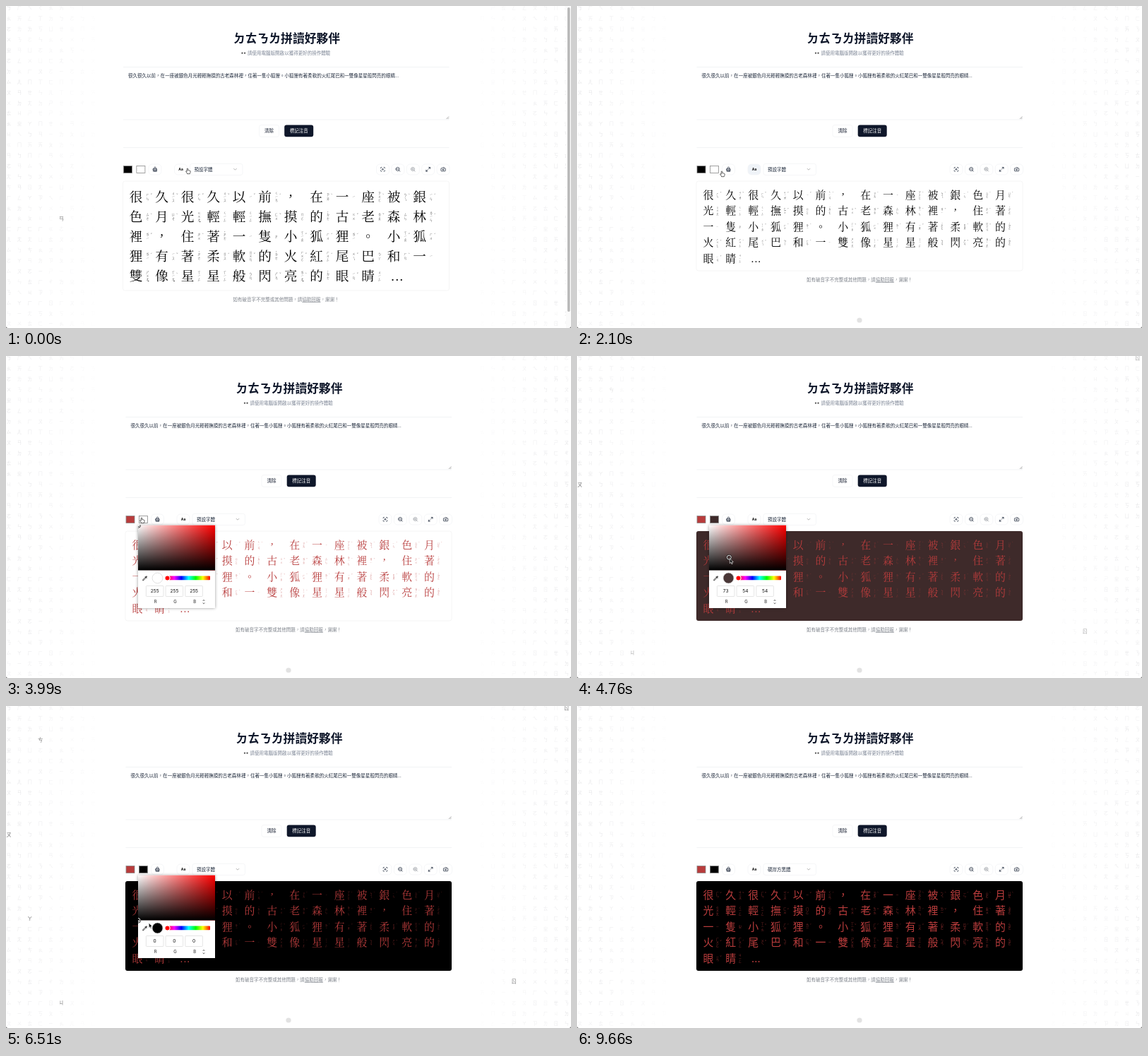
These frames come from a looping animation (800 px wide and 456 px high, 9730 ms). An HTML page:

```html
<!DOCTYPE html>
<html lang="zh-Hant">
<head>
<meta charset="utf-8">
<title>注音標記</title>
<style>
  html, body { margin: 0; width: 100%; height: 100%; overflow: hidden; background: #fff; }
  #stage { display: block; width: 100vw; height: 100vh; }
  text { font-family: "Noto Sans CJK TC", "Noto Sans CJK", sans-serif; white-space: pre; }
  .latin { font-family: Inter, "Liberation Sans", sans-serif; }
  .serif text { font-family: "Noto Serif CJK TC", "Noto Serif CJK", "Noto Sans CJK TC", serif; }
  .mid { text-anchor: middle; }
  .icon { fill: none; stroke-linecap: round; stroke-linejoin: round; stroke-width: 2.4; }
</style>
</head>
<body>
<svg id="stage" viewBox="0 0 800 456">
  <defs>
    <linearGradient id="sat"><stop stop-color="#fff"/><stop offset="1" stop-color="#f00"/></linearGradient>
    <linearGradient id="val" x2="0" y2="1"><stop stop-opacity="0"/><stop offset="1"/></linearGradient>
    <linearGradient id="hue"></linearGradient>
    <filter id="soft" x="-10%" y="-10%" width="120%" height="120%"><feGaussianBlur stdDeviation="2"/></filter>
  </defs>
  <g id="letters"></g>
  <g id="page"></g>
  <g id="scrollbar">
    <rect x="793" width="7" height="456" fill="#fafafa"/>
    <rect x="795" y="2" width="3.6" height="431" rx="1.8" fill="#b9b9b9"/>
  </g>
  <g id="menu"></g>
  <g id="picker"></g>
  <path fill="#666" d="M0 453v3h3a3 3 0 0 1-3-3zM800 453v3h-3a3 3 0 0 0 3-3z"/>
  <g id="cursor" stroke="#111" stroke-width=".8" stroke-linejoin="round" fill="#fff">
    <path id="hand" transform="scale(.8)" d="M-1 1a1 1 0 0 1 2 0v2.6q1-.6 1.5.2 1-.5 1.4.3 1.2-.2 1.2.8v1.6q0 1.2-1 2.2v.9H-.6v-.9L-2.8 5.6q-.3-1.1.8-1L-1 5.4z"/>
    <path id="arrow" fill="#111" stroke="#fff" stroke-width=".6" d="M0 0v7l1.6-1.5 1.1 2.5 1.2-.5-1.1-2.4h2.2z"/>
  </g>
</svg>
<script>
const LOOP = 9730;
const STORY = '很久很久以前，在一座被銀色月光輕輕撫摸的古老森林裡，住著一隻小狐狸。小狐狸有著柔軟的火紅尾巴和一雙像星星般閃亮的眼睛';
const SOUNDS = {};
('很ㄏㄣˇ 久ㄐㄧㄡˇ 以ㄧˇ 前ㄑㄧㄢˊ 在ㄗㄞˋ 一ㄧ 座ㄗㄨㄛˋ 被ㄅㄟˋ 銀ㄧㄣˊ 色ㄙㄜˋ 月ㄩㄝˋ 光ㄍㄨㄤ 輕ㄑㄧㄥ 撫ㄈㄨˇ 摸ㄇㄛ ' +
 '的ㄉㄜ˙ 古ㄍㄨˇ 老ㄌㄠˇ 森ㄙㄣ 林ㄌㄧㄣˊ 裡ㄌㄧˇ 住ㄓㄨˋ 著ㄓㄜ˙ 隻ㄓ 小ㄒㄧㄠˇ 狐ㄏㄨˊ 狸ㄌㄧˊ 有ㄧㄡˇ 柔ㄖㄡˊ 軟ㄖㄨㄢˇ 火ㄏㄨㄛˇ ' +
 '紅ㄏㄨㄥˊ 尾ㄨㄟˇ 巴ㄅㄚ 和ㄏㄢˋ 雙ㄕㄨㄤ 像ㄒㄧㄤˋ 星ㄒㄧㄥ 般ㄅㄢ 閃ㄕㄢˇ 亮ㄌㄧㄤˋ 眼ㄧㄢˇ 睛ㄐㄧㄥ')
  .split(' ').forEach(s => SOUNDS[s[0]] = s.slice(1));

const $ = id => document.getElementById(id);
function add(parent, tag, attrs = {}, content) {
  const el = document.createElementNS('http://www.w3.org/2000/svg', tag);
  for (const k in attrs) el.setAttribute(k, attrs[k]);
  if (content !== undefined) el.textContent = content;
  return parent.appendChild(el);
}
const show = (el, on) => el.setAttribute('visibility', on ? 'visible' : 'hidden');
// y is the optical middle of the glyphs
const label = (parent, x, y, size, fill, str, more) =>
  add(parent, 'text', { x, y: y + size * .375, 'font-size': size, fill, ...more }, str);
const box = (parent, x, y, width, height, fill, more) =>
  add(parent, 'rect', { x, y, width, height, fill, ...more });
const icon = (parent, x, y, d, stroke = '#1e293b') =>
  add(parent, 'path', { class: 'icon', d, stroke, transform: `translate(${x - 3.8} ${y - 3.8}) scale(.315)` });
const mid = { class: 'mid' }, edge = { rx: 3, stroke: '#f1f2f5', 'stroke-width': .7 };

// Faint backdrop of phonetic letters, fading out towards the middle.
const PITCH = 14.9, cellX = c => 4 + c * PITCH, cellY = r => 3 + r * PITCH;
let seed = 7;
const random = () => (seed = seed * 16807 % 2147483647) / 2147483647;
for (let r = 0; r < 31; r++) for (let c = 0; c < 54; c++) {
  const letter = String.fromCharCode(0x3105 + Math.floor(random() * 37));
  const alpha = Math.min(1, (Math.abs(cellX(c) - 400) - 260) / 130) * (.07 + .08 * random());
  if (alpha > .01) label($('letters'), cellX(c), cellY(r), 6.5, '#334', letter, { ...mid, opacity: alpha.toFixed(3) });
}
const glows = [
  [5, 20, 'ㄢ', -500, 700], [3, 3, 'ㄘ', 4700, 8700], [0, 12, 'ㄡ', 4300, 8800], [2, 20, 'ㄚ', 4900, 8600],
  [5, 28, 'ㄐ', 4500, 8900], [48, 26, 'ㄖ', 4500, 8800], [53, 0, 'ㄖ', 4500, 8900]
].map(([c, r, letter, from, to]) => ({
  from, to, el: label($('letters'), cellX(c), cellY(r), 7.5, '#555', letter, mid)
}));

// Page
const page = $('page'), INK = '#0f172a', LINE = '#eceef1', BODY = 6.53;
const rule = y => add(page, 'path', { d: `M169.5 ${y}h461.5`, stroke: LINE, 'stroke-width': .7 });
label(page, 401, 45.3, 16.8, INK, 'ㄉㄊㄋㄌ拼讀好夥伴', { ...mid, 'font-weight': 700 });
for (const x of [338.2, 341.8]) {
  add(page, 'ellipse', { cx: x, cy: 66.5, rx: 1.5, ry: 1.7, fill: '#ddd' });
  add(page, 'circle', { cx: x - .3, cy: 66.7, r: .9, fill: '#333' });
}
label(page, 345.5, 67, BODY, '#7b8494', '請使用電腦版開啟以獲得更好的操作體驗');
rule(86.5);
rule(161);
label(page, 176.5, 99, BODY, '#1e293b', STORY + '...');
add(page, 'path', { d: 'M627 160l3.5-3.5M629 160l1.5-1.5', stroke: '#777', 'stroke-width': .6 });
box(page, 362, 168.5, 28, 16.8, '#fff', edge);
label(page, 376, 177, BODY, INK, '清除', { ...mid, 'font-weight': 500 });
box(page, 397.7, 168.5, 41, 16.8, INK, { rx: 3 });
label(page, 418.2, 177, BODY, '#fff', '標記注音', { ...mid, 'font-weight': 500 });
rule(200.5);

const swatches = [170, 188.4].map(x => box(page, x, 226.5, 12, 10, '#000', { stroke: '#8a8a8a', 'stroke-width': .8 }));
const button = x => box(page, x - 9, 224, 18, 15, '#fff', { ...edge, rx: 5 });
button(214.5);
icon(page, 214.5, 231.3, 'M8 10V5a4 3 0 0 1 8 0v5M4 10h16v5H4zM5 15l-1 6h16l-1-6M10 21v-3M15 21v-3');
const sizeButton = button(251);
label(page, 251, 231.3, 5, '#111', 'Aa', { class: 'mid latin', 'font-weight': 700 });
box(page, 264, 223.3, 74.5, 16.2, '#fff', edge);
const fontName = label(page, 270, 231.3, BODY, '#1e293b');
icon(page, 328, 231.3, 'M6 9l6 6 6-6', '#999');

const LENS = 'M3 11a8 8 0 1 0 16 0a8 8 0 1 0-16 0M21 21l-4.3-4.3M8 11h6';
[
  'M3 7V5a2 2 0 0 1 2-2h2M17 3h2a2 2 0 0 1 2 2v2M21 17v2a2 2 0 0 1-2 2h-2M7 21H5a2 2 0 0 1-2-2v-2M9 12a3 3 0 1 0 6 0a3 3 0 1 0-6 0',
  LENS,
  LENS + 'M11 8v6',
  'M15 3h6v6M9 21H3v-6M21 3l-7 7M3 21l7-7',
  'M14.5 4h-5L7 7H4a2 2 0 0 0-2 2v9a2 2 0 0 0 2 2h16a2 2 0 0 0 2-2V9a2 2 0 0 0-2-2h-3zM9 13a3 3 0 1 0 6 0a3 3 0 1 0-6 0'
].forEach((d, i) => {
  const x = 537 + i * 21.4;
  button(x);
  icon(page, x, 231.3, d, i === 2 ? '#94989f' : undefined);
});

const panel = box(page, 169, 248, 462, 127, '#fff', { rx: 3, stroke: '#000', 'stroke-opacity': .06, 'stroke-width': .7 });

function annotated(size, columns, x0, y0, dx) {
  const g = add(page, 'g', { class: 'serif' });
  const place = i => [x0 + i % columns * dx, y0 + Math.floor(i / columns) * size * 1.5];
  [...STORY].forEach((ch, i) => {
    const [x, y] = place(i), small = size * .285;
    label(g, x, y, size, 'currentColor', ch, mid);
    const sound = SOUNDS[ch] || '', parts = sound.replace(/[ˇˊˋ˙]/, ''), tone = sound.slice(parts.length);
    const top = y - (parts.length - 1) * small / 2;
    const tiny = (px, py, str) => label(g, px, py, small, 'currentColor', str, { ...mid, opacity: .8 });
    [...parts].forEach((p, k) => tiny(x + size * .87, top + k * small, p));
    if (tone === '˙') tiny(x + size * .87, top - small * .7, tone);
    else if (tone) tiny(x + size * 1.17, y - small * .4, tone);
  });
  const [x, y] = place(STORY.length);
  label(g, x + size * .25, y, size, 'currentColor', '...', mid);
  return g;
}
const large = annotated(18.66, 12, 187.6, 270, 36.5);
const small = annotated(14.93, 14, 186, 267.5, 31.8);

const foot = add(page, 'g');
const note = label(foot, 400, 387.5, BODY, '#7d828a', '如有破音字不完整或其他問題，請', mid);
add(note, 'tspan', { 'text-decoration': 'underline' }, '協助回報');
add(note, 'tspan', {}, '，謝謝！');
add(foot, 'circle', { cx: 400, cy: 445, r: 3.6, fill: '#e2e2e2' });

// Font menu
const FONTS = ['預設字體', '硯岸方黑體'];
box($('menu'), 264, 242, 74.5, 30, '#fff', { ...edge, stroke: '#dfe2e7' });
const hover = box($('menu'), 266, 256.5, 70.5, 13, '#f1f5f9', { rx: 2 });
FONTS.forEach((f, i) => label($('menu'), 270, 250.5 + i * 12.5, BODY, '#1e293b', f));

// Colour picker
const PAD_W = 109, PAD_H = 64, PAD_Y = 240;
for (let i = 0; i <= 6; i++) add($('hue'), 'stop', { offset: i / 6, 'stop-color': `hsl(${360 - i * 60} 100% 50%)` });
box($('picker'), 0, PAD_Y, PAD_W, 117, '#000', { opacity: .4, filter: 'url(#soft)' });
const pop = add($('picker'), 'svg', { y: PAD_Y - .5, width: PAD_W, height: 117.5 });
box(pop, 0, 0, PAD_W, 118, '#fff');
for (const fill of ['url(#sat)', 'url(#val)']) box(pop, 0, 0, PAD_W, PAD_H, fill);
const thumb = add(pop, 'g');
add(thumb, 'circle', { r: 3, fill: 'none', stroke: '#111', 'stroke-width': 1.8 });
add(thumb, 'circle', { r: 3, fill: 'none', stroke: '#fff', 'stroke-width': .9 });
icon(pop, 10, 75, 'M2 22l1-4L13 8l3 3L6 21zM12 5l7 7M15 8l3-5 3 3-5 3z', '#111');
const chip = add(pop, 'circle', { cx: 27.5, cy: 75, r: 7.4, stroke: '#ccc', 'stroke-width': .6 });
box(pop, 41, 72, 61, 5.8, 'url(#hue)', { rx: 1 });
add(pop, 'circle', { cx: 41.5, cy: 75, r: 3.6, fill: '#f00', stroke: '#fff', 'stroke-width': 1.2 });
const fields = ['R', 'G', 'B'].map((name, i) => {
  const x = 23.7 + i * 27.7;
  box(pop, x - 12.3, 86, 24.6, 15, '#fff', { rx: 1, stroke: '#d4d4d4', 'stroke-width': .6 });
  label(pop, x + 1, 108.7, 6, '#222', name, { class: 'mid latin' });
  return label(pop, x, 93.5, 6.6, '#111', '', { class: 'mid latin' });
});
add(pop, 'path', { d: 'M91.7 107.5l1.3-1.8 1.3 1.8M91.7 109.8l1.3 1.8 1.3-1.8', fill: 'none', stroke: '#444', 'stroke-width': .7 });

// Motion: [time, x, y] or [time, saturation, value]
const INK_TRACK = [[2600, 0, 0], [2900, .75, .55], [3200, .673, .722]];
const PAPER_TRACK = [[4250, 0, 1], [4690, .32, .243], [4760, .26, .286], [5250, 0, .259], [5700, 0, .259], [6200, 0, 0]];
const CURSOR_TRACK = [
  [0, 257, 230], [1900, 257, 230], [2100, 205, 234], [2280, 177, 230], [2400, 177, 230], [2600, 169, 304],
  [3200, 242.4, 257.8], [3500, 242.4, 257.8], [3800, 192, 229], [4050, 192, 229], [4250, 187, 240],
  [6200, 187, 304], [6400, 187, 304], [6900, 310, 330], [7200, 310, 330], [7560, 288, 279], [7800, 288, 279],
  [8250, 300, 230], [8600, 300, 230], [8950, 288, 261]
];
const linear = u => u, ease = u => u * u * (3 - 2 * u);
function sample(track, t, curve = linear) {
  const next = track.findIndex(p => p[0] > t);
  if (next < 0) return track[track.length - 1].slice(1);
  if (next === 0) return track[0].slice(1);
  const a = track[next - 1], b = track[next], u = curve((t - a[0]) / (b[0] - a[0]));
  return [a[1] + (b[1] - a[1]) * u, a[2] + (b[2] - a[2]) * u];
}
const channels = ([s, v]) => [v, v * (1 - s), v * (1 - s)].map(c => Math.round(c * 255));
const rgb = sv => `rgb(${channels(sv)})`;
const within = (t, from, to) => t >= from && t < to;

function render(t) {
  const big = t < 1050, sans = t >= 9300;
  page.setAttribute('transform', `translate(${big ? -3.5 : 0} 0)`);
  show($('scrollbar'), big);
  show(large, big);
  show(small, !big);
  panel.setAttribute('height', big ? 155 : 127);
  foot.setAttribute('transform', `translate(0 ${big ? 28 : 0})`);
  small.setAttribute('class', sans ? '' : 'serif');
  fontName.textContent = FONTS[+sans];
  sizeButton.setAttribute('fill', within(t, 1000, 2200) ? '#eff3f8' : '#fff');

  const ink = rgb(sample(INK_TRACK, t - 70)), paper = rgb(sample(PAPER_TRACK, t - 70));
  large.style.color = small.style.color = ink;
  panel.setAttribute('fill', paper);
  swatches[0].setAttribute('fill', ink);
  swatches[1].setAttribute('fill', paper);

  const inkOpen = within(t, 2380, 3600), paperOpen = within(t, 3950, 7100);
  const left = inkOpen ? 169 : 187;
  const tone = sample(inkOpen ? INK_TRACK : PAPER_TRACK, t);
  const [px, py] = [tone[0] * PAD_W, (1 - tone[1]) * PAD_H];
  show($('picker'), inkOpen || paperOpen);
  $('picker').setAttribute('transform', `translate(${left} 0)`);
  thumb.setAttribute('transform', `translate(${px} ${py})`);
  chip.setAttribute('fill', rgb(tone));
  channels(tone).forEach((c, i) => fields[i].textContent = c);

  show($('menu'), within(t, 8400, 9300));
  show(hover, within(t, 8850, 9300));

  const dragging = within(t, 2600, 3500) || within(t, 4250, 6400);
  const pointing = dragging || within(t, 6400, 7100);
  const [cx, cy] = dragging ? [left + px + 1, PAD_Y + py + 1] : sample(CURSOR_TRACK, t, ease);
  $('cursor').setAttribute('transform', `translate(${cx} ${cy})`);
  show($('hand'), !pointing && t < 9590);
  show($('arrow'), pointing);

  for (const { el, from, to } of glows)
    el.setAttribute('opacity', Math.max(0, Math.min(1, (t - from) / 400, (to - t) / 400)) * .75);
}

let start;
function tick(now) {
  start ??= now;
  render((now - start) % LOOP);
  requestAnimationFrame(tick);
}
render(0);
requestAnimationFrame(tick);
</script>
</body>
</html>
```
